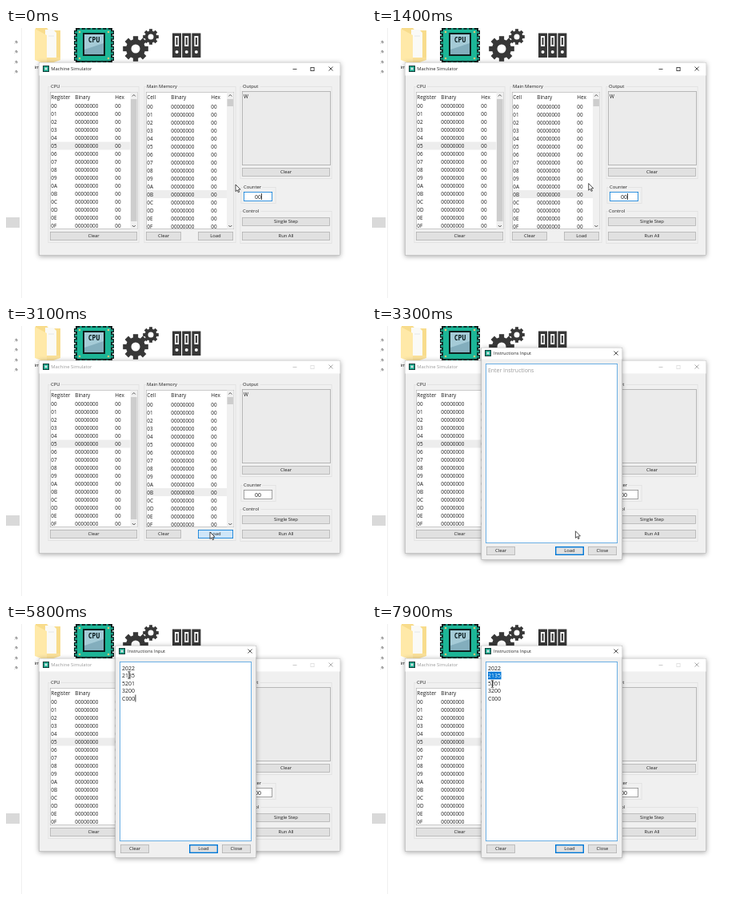
These frames come from a looping animation (450x338 px, 8 s). An HTML page with a canvas:

```html
<!DOCTYPE html>
<html lang="en">
<head>
<meta charset="utf-8">
<title>Machine Simulator</title>
<style>
html, body { margin: 0; width: 100%; height: 100%; overflow: hidden; background: #fff; }
canvas { display: block; }
</style>
</head>
<body>
<canvas id="stage" width="450" height="338"></canvas>
<script>
const ctx = document.getElementById('stage').getContext('2d');
const LOOP = 8000;
const BLUE = '#0078d7', FACE = '#f0f0f0', INK = '#1c1c1c', DARK = '#373737';
const UI = 5.85, TABLE = 6.35, EDIT = 6.95;
const T = { hover: 2650, blur: 2900, dialog: 3200, paste: 5100, first: 6300, second: 7000 };
const PROGRAM = ['2022', '2135', '5201', '3200', 'C000'];

// Pointer hotspot: time, x, y
const PATH = [
  [0, 287, 196], [800, 288, 195.5], [1200, 288, 195.5], [1800, 222, 192],
  [2200, 200.5, 190], [2350, 206, 196], [2700, 254, 257], [3100, 255, 258],
  [3450, 254, 256], [3700, 203, 181], [4100, 194, 121], [4500, 194, 121],
  [4800, 195, 132], [5200, 194, 132], [5800, 154, 64], [5950, 148, 56],
  [6300, 160, 56], [6700, 157, 60], [7000, 156, 65], [7500, 155, 66], [7900, 150.5, 75]
];

function rect(x, y, w, h, fill) {
  ctx.fillStyle = fill;
  ctx.fillRect(x, y, w, h);
}

function frame(x, y, w, h, color, line = 1) {
  ctx.strokeStyle = color;
  ctx.lineWidth = line;
  ctx.strokeRect(x + line / 2, y + line / 2, w - line, h - line);
}

function box(x, y, w, h, fill, border, line) {
  rect(x, y, w, h, fill);
  frame(x, y, w, h, border, line);
}

function text(str, x, y, size = UI, color = INK, align = 'left') {
  ctx.font = `${size}px "Open Sans", "Noto Sans", sans-serif`;
  ctx.fillStyle = color;
  ctx.textAlign = align;
  ctx.textBaseline = 'alphabetic';
  ctx.fillText(str, x, y + size * 0.36);
}

function lines(points, color, width = 1) {
  ctx.strokeStyle = color;
  ctx.lineWidth = width;
  ctx.beginPath();
  points.forEach(([x, y], i) => i ? ctx.lineTo(x, y) : ctx.moveTo(x, y));
  ctx.stroke();
}

function poly(points, fill) {
  ctx.fillStyle = fill;
  ctx.beginPath();
  points.forEach(([x, y]) => ctx.lineTo(x, y));
  ctx.closePath();
  ctx.fill();
}

function disc(x, y, r, fill) {
  ctx.fillStyle = fill;
  ctx.beginPath();
  ctx.arc(x, y, r, 0, Math.PI * 2);
  ctx.fill();
}

function button(label, x, y, w, { focus = false, hover = false } = {}) {
  const border = focus || hover ? BLUE : '#b4b4b4';
  box(x, y, w, 11, hover ? '#cfe6f8' : '#e1e1e1', border, focus ? 1.4 : 0.8);
  text(label, x + w / 2, y + 5.3, UI, INK, 'center');
}

function group(label, x, y, w, h, labelWidth, labelY = y) {
  frame(x, y, w, h, '#e0e0e0', 0.8);
  rect(x + 3, y - 3, labelWidth, 6, FACE);
  text(label, x + 3.5, labelY, UI);
}

function cross(x, y, color) {
  lines([[x - 2.5, y - 2.5], [x + 2.5, y + 2.5]], color, 0.8);
  lines([[x + 2.5, y - 2.5], [x - 2.5, y + 2.5]], color, 0.8);
}

function chipIcon(x, y) {
  rect(x, y, 8, 8, '#173f3b');
  rect(x + 1, y + 1, 6, 6, '#19a78b');
  rect(x + 2.5, y + 2.5, 3, 3, '#d5e8e6');
}

function windowFace(x, y, w, h, barHeight) {
  ctx.save();
  ctx.shadowColor = 'rgba(0,0,0,.34)';
  ctx.shadowBlur = 6;
  ctx.shadowOffsetY = 1;
  rect(x, y, w, h, FACE);
  ctx.restore();
  frame(x, y, w, h, '#aaa', 0.6);
  rect(x + 0.5, y + 0.5, w - 1, barHeight, '#fff');
}

function gear(x, y, r, hole) {
  const teeth = 8;
  ctx.save();
  ctx.translate(x, y);
  disc(0, 0, r * 0.76, DARK);
  for (let i = 0; i < teeth; i++) {
    ctx.rotate(Math.PI * 2 / teeth);
    rect(-r * 0.2, -r, r * 0.4, r * 0.5, DARK);
  }
  disc(0, 0, hole, '#fff');
  ctx.restore();
}

function folder() {
  poly([[37, 0], [51, 0], [54, 3], [68, 3], [68, 40], [37, 40]], '#f8dc8c');
  poly([[49, 2], [59, 2], [63, 6], [63, 40], [49, 40]], '#fafaf7');
  lines([[53, 10], [60, 10]], '#e4e7e8');
  poly([[36, 1], [51, 9], [51, 46], [36, 40]], '#ffe9a8');
  poly([[51, 37], [68, 37], [68, 40], [51, 46]], '#fbe19a');
  text('im', 35.5, 49, UI);
}

function processor() {
  const teal = '#1cb697', black = '#10201f';
  rect(87, 0, 46, 43, black);
  for (let i = 0; i < 6; i++) {
    const p = i * 6.6;
    for (const y of [-2, 41]) box(91 + p, y, 5, 5, teal, black, 1.3);
    for (const x of [85, 130]) box(x, 3 + p, 5, 5, teal, black, 1.3);
  }
  rect(89, 2, 42, 39, teal);
  box(96, 6, 28, 29, '#a5cbd7', black, 2);
  poly([[98, 33], [98, 27], [122, 19], [122, 33]], '#83aebd');
  ctx.font = 'bold 8px "DejaVu Sans Mono", monospace';
  ctx.textAlign = 'center';
  ctx.fillStyle = '#071719';
  ctx.fillText('CPU', 110, 17.5);
  for (const x of [92, 128]) for (const y of [5, 38]) disc(x, y, 1.3, '#dfc777');
}

function binders() {
  for (let i = 0; i < 3; i++) {
    const x = 208 + i * 12.2;
    rect(x, 6.5, 11, 30.5, DARK);
    rect(x + 3, 10, 5, 13, '#fff');
    rect(x + 4.5, 12, 2, 9, DARK);
    disc(x + 5.5, 30, 2, '#fff');
  }
}

function desktop() {
  rect(0, 0, 450, 338, '#fff');
  lines([[19.5, 0], [19.5, 338]], '#f0f0f0');
  rect(0, 237, 17, 13, '#d9d9d9');
  for (const y of [18, 30, 43, 55]) {
    poly([[11.5, y - 1.5], [13, y - 2.5], [15, y], [13.5, y + 1]], '#999');
    lines([[11, y - 1], [13.5, y + 1.5]], '#999', 0.7);
    lines([[12, y + 0.5], [10.5, y + 2]], '#aaa', 0.6);
  }
  folder();
  processor();
  gear(162, 26, 15.8, 5.5);
  gear(181, 11, 9.8, 3.5);
  binders();
}

function table(x, right, y, head, selected, thumbHeight) {
  box(x, 80, right - x, 172, '#fff', '#b4b4b4', 0.7);
  const columns = [1.3, 31.3, 81.3].map(offset => x + offset);
  head.forEach((name, i) => text(name, columns[i], 87, TABLE));
  rect(x + 1, y + selected * 10 - 5, right - x - 10, 10, '#ededed');
  for (let i = 0; i < 16; i++) {
    const cells = ['0' + i.toString(16).toUpperCase(), '00000000', '00'];
    cells.forEach((cell, c) => text(cell, columns[c], y + i * 10 + 0.3, TABLE));
  }
  rect(right - 9, 80.5, 8.5, 171, FACE);
  rect(right - 8.5, 89, 7.5, thumbHeight, '#cdcdcd');
  const mid = right - 4.7;
  lines([[mid - 2, 85.5], [mid, 83.5], [mid + 2, 85.5]], '#555');
  lines([[mid - 2, 247], [mid, 249], [mid + 2, 247]], '#555');
}

function simulator(t) {
  const active = t < T.blur;
  const tone = active ? '#222' : '#999';
  windowFace(41, 43, 377, 242, 16);
  chipIcon(46, 47);
  text('Machine Simulator', 56.3, 51, UI, tone);
  lines([[358.5, 51.5], [363.5, 51.5]], active ? tone : '#bbb', 0.8);
  frame(380.5, 49, 5, 5, active ? tone : '#ddd', 0.8);
  cross(406, 51, tone);

  group('CPU', 52.5, 73, 114, 196, 13);
  table(55, 164.5, 97.5, ['Register', 'Binary', 'Hex'], 5, 153);
  button('Clear', 55, 255, 109);

  group('Main Memory', 172.5, 73, 115, 196, 40);
  table(175, 285, 98, ['Cell', 'Binary', 'Hex'], 11, 9);
  button('Clear', 175, 255, 44);
  button('Load', 240, 255, 44, { hover: t >= T.hover });

  group('Output', 292.5, 73, 115, 116, 22);
  box(295, 79, 111, 93, '#ebebeb', '#aaa', 0.8);
  text('W', 297, 86, TABLE);
  button('Clear', 295, 175, 110);

  group('Counter', 293.5, 199, 44, 21, 24, 198.5);
  box(297, 205, 36, 12, '#fff', active ? BLUE : '#8a8a8a', 0.8);
  text('00', 315, 211, EDIT, INK, 'center');
  if (active && (t + 100) % 1200 < 600) rect(319.2, 207, 0.8, 8, '#111');

  group('Control', 292.5, 229, 115, 41, 23, 228.5);
  button('Single Step', 295, 237, 110);
  button('Run All', 295, 255, 110);
}

function dialog(t) {
  if (t < T.dialog) return;
  ctx.save();
  ctx.globalAlpha = Math.min(1, (t - T.dialog + 60) / 160);
  windowFace(136.5, 27, 176.5, 266, 14);
  chipIcon(141, 30);
  text('Instructions Input', 152, 34.3, 5.7, '#222');
  cross(305, 34, '#222');
  box(142, 47, 165, 225, '#fff', '#5ba7e2', 0.9);

  if (t < T.paste) {
    text('Enter Instructions', 145, 55.3, EDIT, '#999');
  } else {
    const selected = t >= T.second ? 1 : t >= T.first ? 0 : -1;
    PROGRAM.forEach((word, i) => {
      const y = 55 + i * 9.5;
      if (i === selected) rect(145, y - 4.8, 16.5, 9.6, BLUE);
      text(word, 145, y + 0.3, EDIT, i === selected ? '#fff' : INK);
    });
    if (selected < 0 && (t - T.paste) % 1200 < 840) rect(161.5, 88.5, 0.8, 9, '#111');
  }
  button('Clear', 143, 276, 36);
  button('Load', 229, 276, 36, { focus: true });
  button('Close', 270, 276, 36);
  ctx.restore();
}

function pointerAt(t) {
  const next = PATH.findIndex(key => key[0] > t);
  if (next < 0) return PATH[PATH.length - 1].slice(1);
  const [t0, x0, y0] = PATH[next - 1], [t1, x1, y1] = PATH[next];
  const u = (t - t0) / (t1 - t0), e = u * u * (3 - 2 * u);
  return [x0 + (x1 - x0) * e, y0 + (y1 - y0) * e];
}

function pointer(t) {
  const [x, y] = pointerAt(t);
  ctx.save();
  ctx.translate(x, y);
  if (t > 3600) {
    lines([[0, -4], [0, 4]], '#222', 0.9);
    lines([[-1.8, -4.2], [1.8, -4.2]], '#222', 0.8);
    lines([[-1.8, 4.2], [1.8, 4.2]], '#222', 0.8);
  } else {
    const arrow = [[0, 0], [0, 8.6], [2, 6.8], [3.4, 9.8], [4.7, 9.2], [3.4, 6.3], [6, 6.1]];
    poly(arrow, '#fff');
    lines([...arrow, arrow[0]], '#222', 0.8);
  }
  ctx.restore();
}

function draw(now) {
  const t = now % LOOP;
  desktop();
  simulator(t);
  dialog(t);
  pointer(t);
  requestAnimationFrame(draw);
}
requestAnimationFrame(draw);
</script>
</body>
</html>
```
